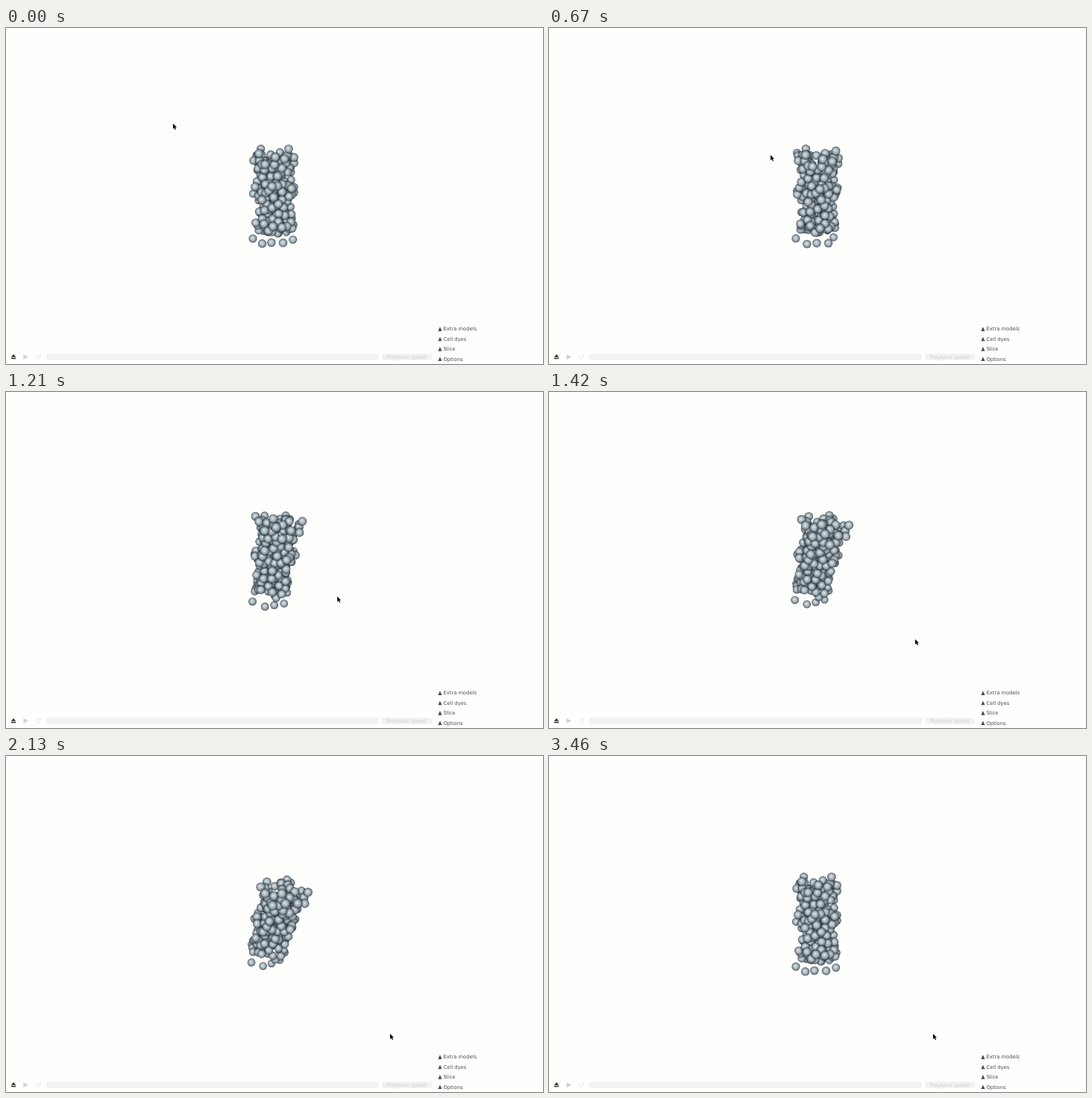
Recreate the animation shown at these times as an HTML page with a canvas. Size 720 px wide and 450 px high, loop 4 s.

```html
<!DOCTYPE html>
<html lang="en">
<head>
<meta charset="utf-8">
<title>Cell model viewer</title>
<style>
  html, body { margin: 0; width: 100%; height: 100%; overflow: hidden; background: #fefefd; }
  canvas, svg { position: absolute; left: 0; top: 0; width: 720px; height: 450px; }
  text { font: 6.75px "DejaVu Sans", sans-serif; fill: #4c4c4c; }
  .off { fill: #cfcfcf; }
  .bar { fill: #f2f2f1; }
</style>
</head>
<body>
<canvas id="view" width="720" height="450"></canvas>
<svg viewBox="0 0 720 450">
  <path d="M6.8 440.8 10 437l3.2 3.8zM6.8 441.7h6.4v1.5H6.8z" fill="#2c2c2c"/>
  <path d="M23.5 437v7l6.5-3.5z" fill="#d2d2d2"/>
  <path d="M45.4 438.6a2.7 2.7 0 1 1-3.4-.6" fill="none" stroke="#e2e2e2" stroke-width=".8"/>
  <path d="M43.6 438.9h2.7v-2.6z" fill="#e2e2e2"/>
  <rect class="bar" x="54" y="436" width="446" height="9" rx="3"/>
  <rect class="bar" x="504" y="436" width="67" height="9" rx="2"/>
  <text class="off" x="537" y="442.8" text-anchor="middle">Playback speed</text>
  <g id="menu"></g>
  <path id="cursor" d="M0 0V7.2L1.7 5.7 2.9 8.4 4 7.9 2.8 5.3H5z" fill="#000" stroke="#fff" stroke-width=".5" paint-order="stroke"/>
</svg>
<script>
const LOOP = 4000, STEP = 62.5;
const DRAG = 420, DRAG_STEPS = 25;
const RESET = 3210, RESET_STEPS = 5;
const R = 5.5, CX = 360, CY = 225, CAMERA = 450;
const GAIN = 0.175 * Math.PI / 180; // turn per dragged pixel

// Cursor path: drag step, x, y
const path = [
  [-1, 224, 128], [4, 297, 170], [9, 409, 231],
  [16, 491, 331], [20, 513, 368], [25, 515, 372]
];

// Outermost cells at the two ends of the column
const endCells = [
  [-16, 62, 12], [-4, 60, 17], [11, 60, 20], [-29, 57, 0], [25, 59, -5],
  [18, -60, 22], [-18, -62, 8], [-25, -57, -19], [7, -57, 10], [-5, -54, 12]
];

let seed = 11;
function rand() {
  seed = (seed * 16807) % 2147483647;
  return seed / 2147483647;
}

// A loosely packed column with two narrow waists
function makeCells() {
  const cells = [...endCells];
  for (let i = 0; i < 6000 && cells.length < 215; i++) {
    const y = -56 + 108 * rand();
    const edge = 25.5 - 3.5 * Math.cos((y + 28) * 2 * Math.PI / 43);
    const a = rand() * 2 * Math.PI, r = edge * Math.cbrt(rand());
    const x = r * Math.cos(a), z = r * Math.sin(a);
    const spaced = cells.every(c => Math.hypot(c[0] - x, c[1] - y, c[2] - z) > 7.5);
    if (spaced && (z < 0 || y < 47)) cells.push([x, y, z]);
  }
  return cells;
}

// Turn p about the unit axis n
function turn(p, n, angle) {
  const c = Math.cos(angle), s = Math.sin(angle);
  const k = (n[0] * p[0] + n[1] * p[1] + n[2] * p[2]) * (1 - c);
  return [
    p[0] * c + (n[1] * p[2] - n[2] * p[1]) * s + n[0] * k,
    p[1] * c + (n[2] * p[0] - n[0] * p[2]) * s + n[1] * k,
    p[2] * c + (n[0] * p[1] - n[1] * p[0]) * s + n[2] * k
  ];
}

function cursorAt(step) {
  const i = Math.max(1, path.findIndex(p => p[0] >= step));
  const [s0, x0, y0] = path[i - 1], [s1, x1, y1] = path[i];
  const f = (step - s0) / (s1 - s0);
  return [x0 + (x1 - x0) * f, y0 + (y1 - y0) * f];
}

// Each drag step turns the model along the cursor's movement
const unit = [[1, 0, 0], [0, 1, 0], [0, 0, 1]];
const poses = [{ cursor: cursorAt(-1), basis: unit }];
for (let i = 0; i <= DRAG_STEPS; i++) {
  const last = poses[i], cursor = cursorAt(i);
  const dx = cursor[0] - last.cursor[0], dy = cursor[1] - last.cursor[1];
  const d = Math.hypot(dx, dy);
  poses.push({ cursor, basis: last.basis.map(v => turn(v, [-dy / d, dx / d, 0], d * GAIN)) });
}

const end = poses[poses.length - 1];
const [ex, ey, ez] = end.basis;
const endAngle = Math.acos((ex[0] + ey[1] + ez[2] - 1) / 2);
const endAxis = [ey[2] - ez[1], ez[0] - ex[2], ex[1] - ey[0]].map(v => v / (2 * Math.sin(endAngle)));

function stepsSince(t, from, max) {
  return Math.max(0, Math.min(max, 1 + Math.floor((t - from) / STEP)));
}

function poseAt(t) {
  if (t < RESET) return poses[stepsSince(t, DRAG, DRAG_STEPS + 1)];
  const angle = endAngle * (1 - stepsSince(t, RESET, RESET_STEPS) / RESET_STEPS);
  return { cursor: end.cursor, basis: unit.map(v => turn(v, endAxis, angle)) };
}

const ctx = document.getElementById("view").getContext("2d");
const cursorEl = document.getElementById("cursor");
const cells = makeCells();

const shade = ctx.createRadialGradient(-0.8, -0.9, 0, 0, 0, R);
[[0, "#dce6ea"], [0.4, "#b7c5cc"], [0.72, "#909ea7"], [0.88, "#66727a"], [1, "#343b40"]]
  .forEach(([at, color]) => shade.addColorStop(at, color));

function disc(r, fill) {
  ctx.fillStyle = fill;
  ctx.beginPath();
  ctx.arc(0, 0, r, 0, 2 * Math.PI);
  ctx.fill();
}

function drawCell([x, y, z]) {
  const k = CAMERA / (CAMERA - z);
  ctx.setTransform(k, 0, 0, k, CX + x * k, CY + y * k);
  // Contact shadow falls on the cells behind only
  ctx.globalCompositeOperation = "source-atop";
  disc(R + 1.4, "rgba(25,32,38,.28)");
  ctx.globalCompositeOperation = "source-over";
  disc(R, shade);
}

function draw(t) {
  const { cursor, basis: [a, b, c] } = poseAt(t);
  ctx.setTransform(1, 0, 0, 1, 0, 0);
  ctx.clearRect(0, 0, 720, 450);
  cells
    .map(p => [0, 1, 2].map(i => p[0] * a[i] + p[1] * b[i] + p[2] * c[i]))
    .sort((p, q) => p[2] - q[2])
    .forEach(drawCell);
  cursorEl.setAttribute("transform", `translate(${cursor})`);
}

document.getElementById("menu").innerHTML = ["Extra models", "Cell dyes", "Slice", "Options"]
  .map((label, i) => {
    const y = 405.3 + 13.4 * i;
    return `<path d="M579.3 ${y + 0.6}h5.2l-2.6-5.6z" fill="#4c4c4c"/><text x="586.5" y="${y}">${label}</text>`;
  }).join("");

const start = performance.now();
function tick() {
  draw((performance.now() - start) % LOOP);
  requestAnimationFrame(tick);
}
tick();
</script>
</body>
</html>
```
